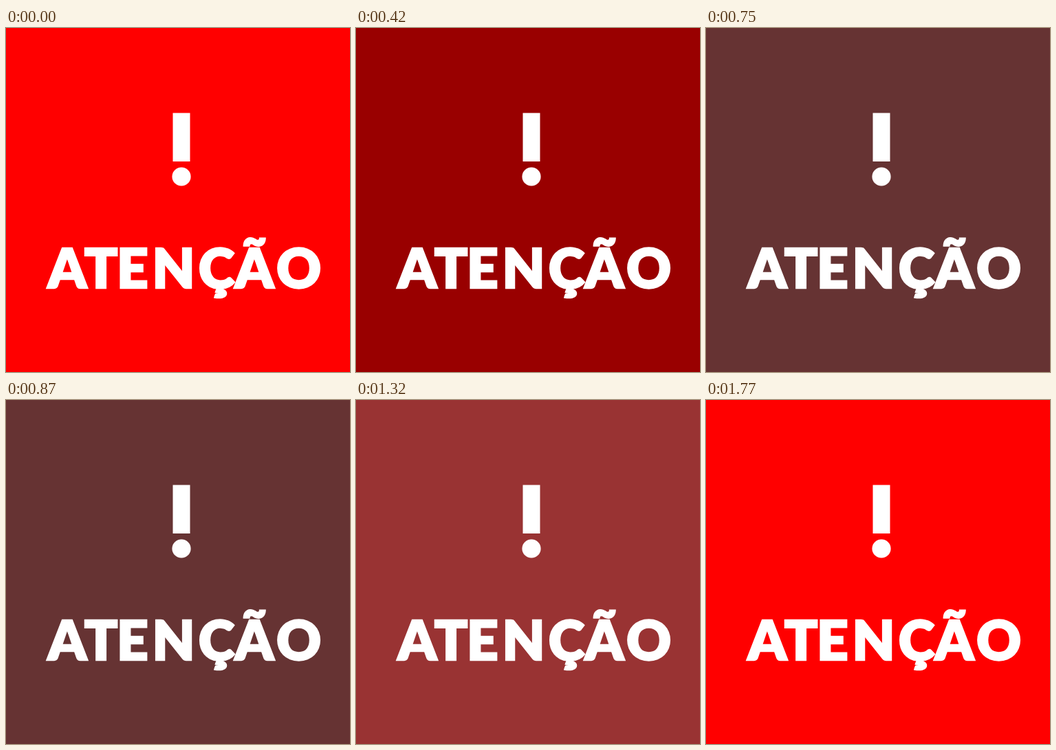
An HTML page for the animation above (1800 ms loop, 500x500 px).

```html
<!DOCTYPE html>
<html lang="pt">
<head>
<meta charset="utf-8">
<title>Atenção</title>
<style>
html, body { margin: 0; width: 100%; height: 100%; overflow: hidden; background: #f00; }
svg { display: block; width: 100vw; height: 100vh; fill: #fff; }
text {
  font: 900 80px Lato, "Open Sans", sans-serif;
  text-anchor: middle;
  stroke: #fff;
  stroke-width: 2.4;
}
</style>
</head>
<body>
<svg viewBox="0 0 500 500">
  <rect x="242.5" y="123.5" width="25" height="70.5"/>
  <circle cx="255" cy="216" r="13.6"/>
  <text y="378" x="89 138 184 243.5 306 361 425.5">ATENÇÃO</text>
</svg>
<script>
const LOOP = 1800, STEP = 30;
const BRIGHT = [255, 0, 0], DARK = [77, 51, 51];
const start = performance.now();

// Linear fade there and back, snapped to the web-safe palette.
function background(ms) {
  const t = Math.floor(ms % LOOP / STEP) * STEP;
  const mix = 1 - Math.abs(t / (LOOP / 2) - 1);
  const rgb = BRIGHT.map((c, i) => Math.round((c + (DARK[i] - c) * mix) / 51) * 51);
  return `rgb(${rgb})`;
}

function draw() {
  document.body.style.background = background(performance.now() - start);
  requestAnimationFrame(draw);
}
draw();
</script>
</body>
</html>
```
